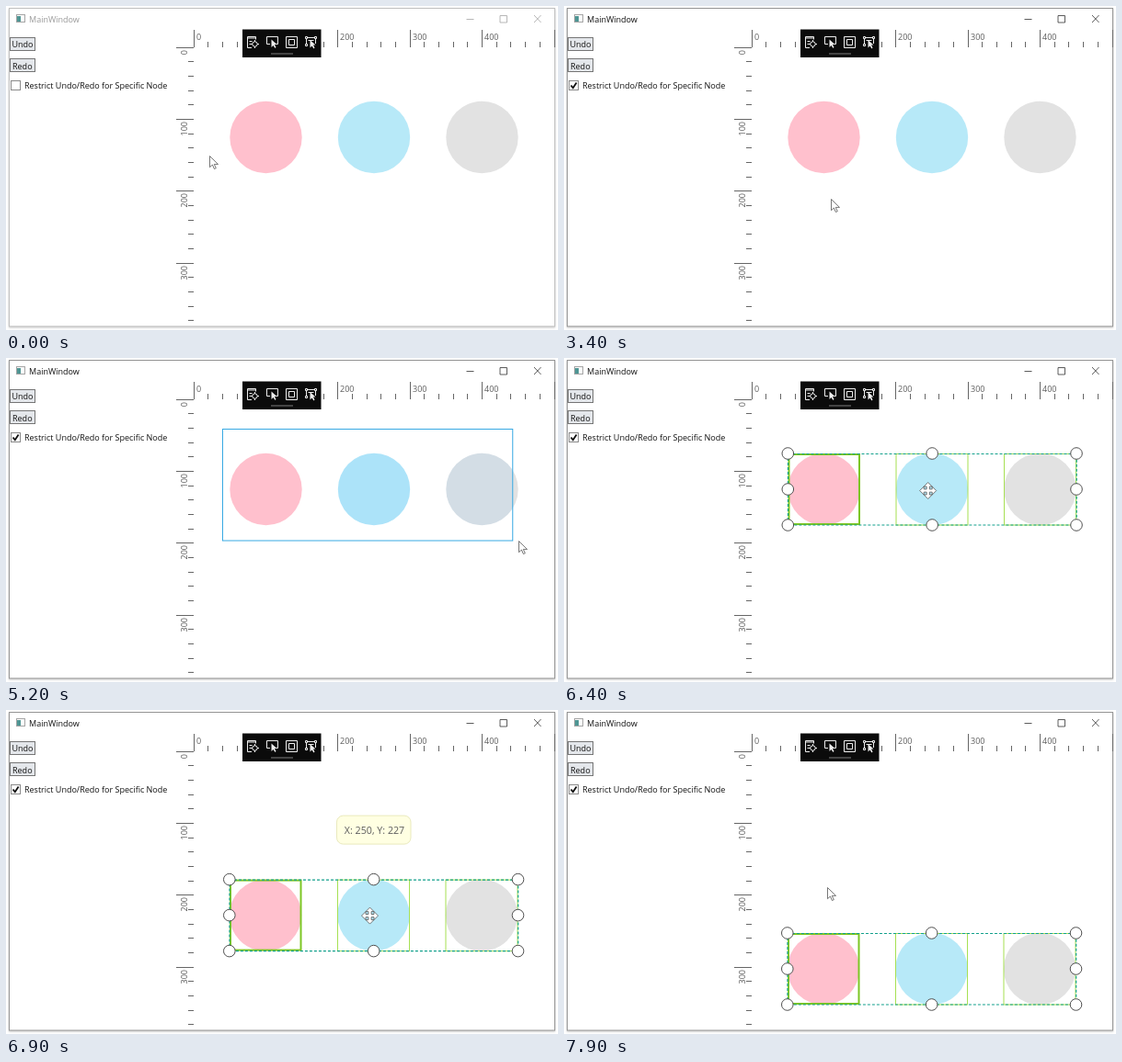
Animation of 600x353 px, one loop 8 s. Source, as an HTML page:

```html
<!DOCTYPE html>
<html lang="en">
<head>
<meta charset="utf-8">
<title>Diagram undo and redo</title>
<style>
  html, body { margin: 0; width: 100%; height: 100%; overflow: hidden; background: #fff; }
  svg { display: block; width: 600px; height: 353px; }
  text { font: 9px "Open Sans", "Noto Sans", sans-serif; fill: #111; }
  .frame { fill: #fff; stroke: #959595; filter: drop-shadow(0 1px 1px rgba(0,0,0,.22)); }
  .caption { stroke: #333; stroke-width: .8; fill: none; }
  .idle .frame { stroke: #c0c0c0; }
  .idle .caption { stroke: #a5a5a5; }
  .idle .title { fill: #9a9a9a; }
  .button { fill: #e4e7eb; stroke: #757575; }
  .check { fill: #fff; stroke: #8a8a8a; }
  .check.hover { fill: #f3f9ff; stroke: #5593ff; }
  .check.down { fill: #d9ecff; stroke: #3c77dd; }
  .ticks { stroke: #666; fill: none; }
  .ruler text { fill: #5c5c5c; }
  .icons { fill: none; stroke: #eee; }
  .dash { fill: none; stroke: #12a08c; stroke-width: 1.2; stroke-dasharray: 3 2; }
  .handles circle { fill: #fff; stroke: #505050; }
  .item { fill: none; stroke: #a6e053; }
  .first { stroke: #7cc623; stroke-width: 2; }
  .band { fill: none; stroke: #37a9e3; }
  .tip rect { fill: #ffffe2; stroke: #e9e9bd; }
  .tip text { font-size: 10.7px; fill: #5c5c5c; text-anchor: middle; }
  .pointer { fill: #fff; stroke: #555; stroke-width: .8; }
</style>
</head>
<body>
<svg id="stage" viewBox="0 0 600 353">
  <defs>
    <clipPath id="discs">
      <circle cx="400" cy="143" r="39.2"/><circle cx="517.5" cy="143" r="39.2"/>
    </clipPath>
  </defs>

  <rect class="frame" x="3.5" y="2.5" width="593" height="346.5"/>
  <rect x="11.5" y="9.5" width="9" height="8" fill="#fff" stroke="#a5a5a5"/>
  <rect x="12" y="11" width="4" height="6" fill="#4f9694"/>
  <text class="title" x="25" y="17.5">MainWindow</text>
  <path class="caption" d="M500.5 14.5h8M537 10.5h7.5v7.5h-7.5zM574 10l7.5 8M581.5 10l-7.5 8"/>

  <rect class="button" x="4.5" y="34.5" width="27" height="14"/>
  <text x="6.5" y="45">Undo</text>
  <rect class="button" x="4.5" y="57.5" width="27" height="14"/>
  <text x="7" y="68.5">Redo</text>
  <rect id="check" class="check" x="5.5" y="81.5" width="10" height="10"/>
  <path id="mark" d="M7.5 86.5l2.3 2.7 3.8-5.8" fill="none" stroke="#111" stroke-width="1.8"/>
  <text x="20" y="90">Restrict Undo/Redo for Specific Node</text>

  <g id="ruler" class="ruler"><path id="ticks" class="ticks"/></g>

  <rect x="257" y="25.5" width="85.5" height="30.5" fill="#0b0b0b"/>
  <path d="M288 52h24" stroke="#444" stroke-width="2"/>
  <g class="icons">
    <path d="M267 45.5h-4.5v-12h9v3M262.5 35h9M264.5 38.5h3M264.5 41.5h2"/>
    <circle cx="270.5" cy="41.5" r="2.7"/>
    <path d="M270.5 37v2M270.5 44v2M266 41.5h2M273 41.5h2"/>
    <path d="M287 41.5h-3.5v-8h12v8h-2"/>
    <path d="M304.5 33.5h12v12h-12zM307.5 36.5h6v6h-6z"/>
    <path d="M325.5 33.5h2v2h-2zM335.500 33.500h2v2h-2zM325.500 41.500h2v2h-2zM328 34.500h7M326.500 36v5M336.500 36v5M328.500 37.500h6"/>
    <path d="M288.5 36.5v8.5l2-2 2 3 1-1-1.5-3h2.5zM330.5 37v8.5l2-2 2 3 1-1-1.5-3h2.5z" fill="#eee" stroke="none"/>
  </g>

  <g id="nodes">
    <circle cx="282.5" cy="143" r="39.2" fill="#ffc0cd"/>
    <circle cx="400" cy="143" r="39.2" fill="#b7e9f8"/>
    <circle cx="517.5" cy="143" r="39.2" fill="#e2e2e2"/>
    <g id="group">
      <rect class="item first" x="244.5" y="105" width="76.5" height="76"/>
      <rect class="item" x="361" y="104.5" width="78" height="77.5"/>
      <rect class="item" x="478.5" y="104.5" width="78" height="77.5"/>
    </g>
    <g id="selection"><rect id="dash" class="dash" x="243.5" y="104.5" height="77.5"/><g id="handles" class="handles"></g></g>
  </g>

  <g clip-path="url(#discs)"><rect id="tint" fill="rgba(76,180,255,.1)"/></g>
  <rect id="band" class="band"/>

  <g id="tip" class="tip">
    <rect x="359.5" y="34.5" width="80.5" height="31" rx="7"/>
    <text id="coords" x="400.5" y="54"></text>
  </g>

  <g id="pointer" class="pointer">
    <path id="arrow" d="M.5.5V12.7L3.4 10l2 4.5 1.9-.8-2-4.3h4.2z"/>
    <path id="move" d="M0-9L4.5-4.5H1.6V-1.6H4.5V-4.5L9 0 4.5 4.5V1.6H1.6V4.5H4.5L0 9-4.5 4.5H-1.6V1.6H-4.5V4.5L-9 0-4.5-4.5V-1.6H-1.6V-4.5H-4.5Z"/>
  </g>
</svg>
<script>
const LOOP = 8000, STEP = 100, UNIT = .784;
const ORIGIN = { x: 204, y: 45 };
const NODES = [282.5, 400, 517.5];
const $ = id => document.getElementById(id);
const show = (el, on) => el.setAttribute("visibility", on ? "inherit" : "hidden");
const set = (el, attrs) => { for (const k in attrs) el.setAttribute(k, attrs[k]); };
const add = (parent, tag, attrs) => {
  const el = document.createElementNS("http://www.w3.org/2000/svg", tag);
  set(el, attrs);
  return parent.appendChild(el);
};

// Pointer path: time, x, y (the drag distance is added to y)
const TRACK = [
  [0, 221, 163], [100, 221, 163], [200, 278, 131], [1000, 278, 131],
  [1300, 190, 139], [1700, 13, 95], [1800, 13, 95], [2200, 11, 88],
  [2700, 11, 88], [3000, 289, 210], [3100, 289, 210], [3200, 290, 210],
  [3400, 290, 210], [4000, 235, 77], [4100, 235, 77], [5000, 532, 201],
  [5200, 557, 199], [5300, 562, 199], [5500, 562, 199], [5900, 415, 137],
  [6100, 396, 142], [6300, 396, 142], [6400, 395.7, 144.5], [6500, 395.5, 143.5],
  [7700, 395.5, 143.5], [7800, 345, 96], [7900, 286, 54]
];
// Vertical drag of the three nodes: time, distance
const DRAG = [[6400, 0], [6500, 11], [6900, 80.6], [7200, 122], [7600, 139]];

function at(keys, t, i = 1) {
  const n = keys.findIndex(k => k[0] > t);
  if (n === 0) return keys[0][i];
  if (n < 0) return keys[keys.length - 1][i];
  const a = keys[n - 1], b = keys[n];
  return a[i] + (b[i] - a[i]) * (t - a[0]) / (b[0] - a[0]);
}

function buildRuler() {
  let d = "";
  const snap = v => Math.floor(v) + .5;
  const label = (n, attrs) => add($("ruler"), "text", attrs).textContent = n;
  for (let i = 0; i <= 25; i++) {
    const x = snap(ORIGIN.x + i * 20 * UNIT), major = i % 5 === 0;
    d += `M${x} 45V${major ? 26 : 39}`;
    if (major && i < 25) label(i * 20, { x: x + 2.5, y: 37 });
  }
  for (let i = 0; i < 20; i++) {
    const y = snap(ORIGIN.y + i * 20 * UNIT), major = i % 5 === 0;
    d += `M204 ${y}H${major ? 185 : 198}`;
    if (major) label(i * 20, {
      transform: `translate(196.5 ${y + 2.5}) rotate(-90)`, "text-anchor": "end"
    });
  }
  $("ticks").setAttribute("d", d);
}

for (let i = 0; i < 8; i++) add($("handles"), "circle", { r: 6.3 });

function layoutSelection(right) {
  const xs = [243.3, (243.3 + right) / 2, right], ys = [104, 143, 182];
  $("dash").setAttribute("width", right - 243.3);
  [...$("handles").children].forEach((c, n) => {
    const i = n < 4 ? n : n + 1; // skip the centre of the 3 x 3 grid
    set(c, { cx: xs[i % 3], cy: ys[Math.floor(i / 3)] });
  });
}

function draw(t) {
  const dy = at(DRAG, t), multi = t >= 5500;
  const banding = t >= 4200 && t < 5500;
  const x = at(TRACK, t, 1), y = at(TRACK, t, 2) + dy;

  $("stage").classList.toggle("idle", t < 700);

  const hover = x < 17 && y > 80 && y < 93;
  $("check").setAttribute("class", "check" + (t === 2500 ? " down" : hover ? " hover" : ""));
  show($("mark"), t >= 2600);

  $("nodes").setAttribute("transform", `translate(${dy ? -.5 : 0} ${dy})`);
  show($("selection"), multi || (t >= 800 && t < 3400));
  show($("group"), multi);
  layoutSelection(multi ? 557 : 321.7);

  // The band trails the pointer by half a step
  const box = {
    x: 235.5, y: 77.5,
    width: Math.max(0, at(TRACK, t - 50, 1) - 235.5),
    height: Math.max(0, at(TRACK, t - 50, 2) - 78)
  };
  for (const el of [$("band"), $("tint")]) {
    set(el, box);
    show(el, banding);
  }

  show($("tip"), t >= 6500 && t < 7800);
  $("tip").setAttribute("transform", `translate(0 ${dy})`);
  $("coords").textContent = `X: 250, Y: ${Math.floor(125 + dy / UNIT)}`;

  const over = !banding && NODES.some(cx => Math.hypot(x - cx, y - 143 - dy) < 39);
  $("pointer").setAttribute("transform", `translate(${x} ${y})`);
  show($("arrow"), !over);
  show($("move"), over);
}

buildRuler();
const start = performance.now();
function tick() {
  const t = (performance.now() - start) % LOOP;
  draw(Math.floor(t / STEP) * STEP);
  requestAnimationFrame(tick);
}
tick();
</script>
</body>
</html>
```
